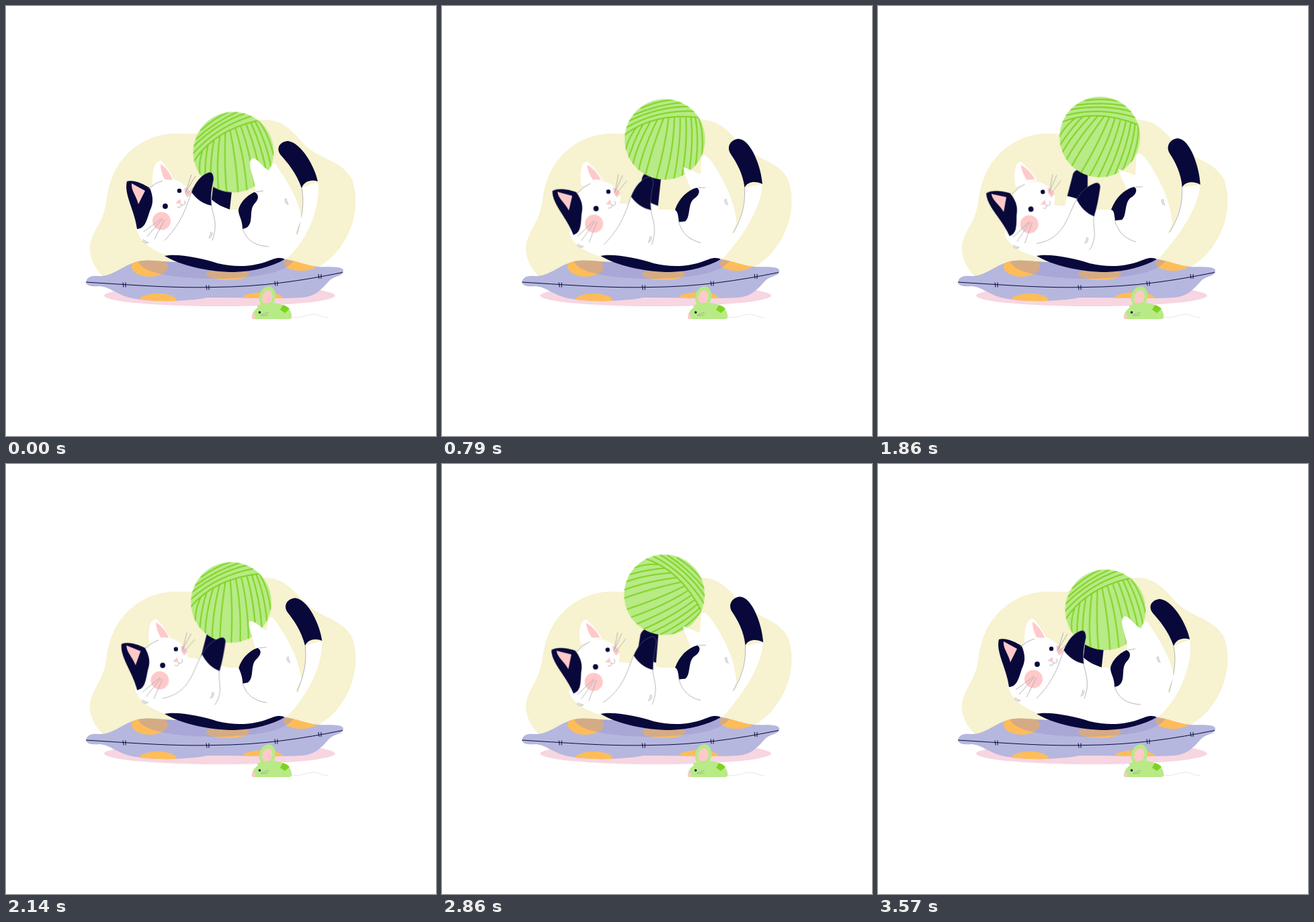
An HTML page without scripts for the animation above (3640 ms loop, 640 px wide and 640 px high).

```html
<!DOCTYPE html>
<html lang="en">
<head>
<meta charset="utf-8">
<title>Cat playing with yarn</title>
<style>
html, body { margin: 0; width: 100%; height: 100%; overflow: hidden; background: #fff; }
svg { display: block; width: 100vw; height: 100vh; }
.ink { fill: #08083a; }
.white { fill: #fff; }
.pink { fill: #ffc9c9; }
.orange { fill: #ffbd59; }
.line { fill: none; stroke: #a3a3ad; stroke-width: .8; }
.seam { fill: none; stroke: #08083a; stroke-width: 1; }
.lime { fill: #b8ea86; }

/* Three swings per loop, then a short rest */
.move, .morph, .kick, .toss, .spin { animation: 3640ms 20ms infinite both; }
.move { animation-name: move; }
.morph { animation-name: morph; }
.kick { animation-name: kick; }
.toss { animation-name: toss; }
.spin { animation-name: spin; }
.move, .morph, .kick { animation-timing-function: cubic-bezier(.37, 0, .63, 1); }
.spin { animation-timing-function: cubic-bezier(.2, 0, 0, 1); }

@keyframes move {
  0%, 32.692%, 65.385%, 98.077%, 100% { transform: none; }
  16.346%, 49.038%, 81.731% { transform: var(--to); }
}
@keyframes morph {
  0%, 32.692%, 65.385%, 98.077%, 100% { d: var(--a); }
  16.346%, 49.038%, 81.731% { d: var(--b); }
}
/* Paws paddle three times per swing */
@keyframes kick {
  0%, 10.897%, 21.795%, 32.692%, 43.59%, 54.487%, 65.385%, 76.282%, 87.179%, 98.077%, 100% { d: var(--a); }
  5.449%, 16.346%, 27.244%, 38.141%, 49.038%, 59.936%, 70.833%, 81.731%, 92.628% { d: var(--b); }
}
@keyframes toss {
  0%, 32.692%, 65.385%, 98.077%, 100% { transform: translateY(0); animation-timing-function: cubic-bezier(.08, .65, .5, 1); }
  16.346%, 49.038%, 81.731% { transform: translateY(-23.5px); animation-timing-function: cubic-bezier(.45, .15, .7, .85); }
}
@keyframes spin {
  0% { transform: rotate(0deg); }
  32.692% { transform: rotate(-360deg); }
  65.385% { transform: rotate(-720deg); }
  98.077%, 100% { transform: rotate(-1080deg); }
}

.tail { --a: path("M464 261C469 295 452 345 418 376L400 376L433 340C442 310 444 290 440 271");
        --b: path("M480 266C476 305 445 345 418 376L400 376L434 337C450 310 453 295 453 270"); }
.tail-line { --a: path("M433 340C442 310 444 290 440 271");
             --b: path("M434 337C450 310 453 295 453 270"); }
.tail-tip { --a: path("M440 271C432 248 418 232 409 222C400 210 410 201 420 201C440 204 460 240 464 261C455 258 444 260 440 271Z");
            --b: path("M453 270C452 250 443 232 435 220C427 207 438 197 447 197C465 198 479 240 480 266C472 261 458 260 453 270Z"); }
.body { --a: path("M194 331C198 350 215 362 238 371C300 398 370 396 416 377L433 345L425 290L372 277L350 303L333 303L306 292L274 282L215 285Z");
        --b: path("M188 340C195 358 215 368 238 374C300 398 370 396 416 377L433 345L425 290L372 275L349 303L324 303L302 298L277 298L205 290Z"); }
.leg { --a: path("M371 278C373 262 358 236 365 228C371 222 380 238 391 245L396 236C398 233 400 233 403 238C414 254 438 290 440 318L425 350L365 330Z");
       --b: path("M371 275C366 262 360 252 358 243C366 247 376 250 383 252L384 224C386 215 394 220 402 232C418 255 436 290 438 325L425 350L365 330Z"); }
.foot { --a: path("M370 277C376 280 377 286 371 293C360 303 370 322 358 330L352 332C352 318 346 312 346 304C348 292 360 281 370 277Z");
        --b: path("M381 269C387 271 385 280 378 284C366 290 371 312 363 318L353 319C351 308 352 305 347 303C354 285 366 273 381 269Z"); }
.thigh { --a: path("M372 277L383 275M352 331C358 350 372 357 391 358");
         --b: path("M383 269L394 269M352 317C357 337 368 346 384 351"); }
.far-arm { --a: path("M306 286L333 302L333 330L290 330Z");
           --b: path("M293 289L324 297L324 330L290 309Z"); }
.far-paw { --a: path("M309 262C314 246 336 244 338 258L333 303C322 300 313 294 306 288Z");
           --b: path("M303 255C309 246 322 250 323 259L324 299C314 295 304 291 293 290Z"); }
.near-arm { --a: path("M236 349C262 322 268 300 276 277L306 290C304 308 318 318 307 349");
            --b: path("M229 345C276 342 278 302 293 281L318 306C314 324 324 337 309 357"); }
.near-paw { --a: path("M301 248C306 246 309 250 309 258C306 272 304 285 306 297C293 295 282 286 276 277C282 262 290 252 301 248Z");
            --b: path("M319 258C326 255 330 259 328 266C326 280 324 292 318 307C306 302 298 292 293 281C299 270 309 262 319 258Z"); }

.head { --to: translate(-6.5px, 5px) rotate(-8deg); transform-origin: 231.5px 320px; }
.ear { --to: rotate(-9deg); transform-origin: 207px 300px; }
.far-ear { --to: translate(1px, -4px); }
.near { --to: translate(6px, 8px); }
.far { --to: translate(-14px, -7px); }
.ball { --to: translateX(-8.5px); }
.hip { --to: translate(7px, 1px); }
</style>
</head>
<body>
<svg viewBox="0 0 640 640">
  <defs>
    <path id="cushion" d="M119 411C121 402 128 401 140 402C160 402 175 385 197 380C212 377 230 380 250 381L400 380L415 377C432 379 449 387 464 388C478 389 502 386 502 394C502 403 490 400 480 410C468 424 458 433 440 434C400 436 350 434 300 434C270 440 210 442 180 433C160 426 155 419 140 417C128 418 120 417 119 411Z"/>
    <clipPath id="in-cushion"><use href="#cushion"/></clipPath>
    <clipPath id="in-ball"><circle r="60"/></clipPath>
    <path id="stitch" d="M-2-3.5L-1 3.5M2-3.5L2 3.5"/>
    <path id="fur" class="line" d="M-2-4L-1 1M0-5L1 0M1 0L3 5M-1 1L1 4"/>
  </defs>

  <path fill="#f7f2cf" d="M145 403C130 390 120 365 127 348C135 325 146 320 150 285C158 225 205 187 260 190C300 192 340 180 375 170C410 165 425 185 445 207C470 230 500 230 515 258C527 290 518 330 500 355C490 372 475 382 464 389L415 400Z"/>
  <ellipse fill="#f7d6e1" cx="318" cy="431" rx="172" ry="16"/>

  <use href="#cushion" fill="#b5b7de"/>
  <g clip-path="url(#in-cushion)">
    <g class="orange">
      <ellipse cx="214" cy="388" rx="27" ry="15"/>
      <ellipse cx="330" cy="399" rx="32" ry="9"/>
      <ellipse cx="439" cy="383" rx="26" ry="11"/>
      <ellipse cx="226" cy="438" rx="28" ry="10"/>
      <ellipse cx="382" cy="435" rx="30" ry="9"/>
    </g>
    <path fill="#9790c9" opacity=".4" d="M196 378C200 398 250 406 320 406C380 404 420 396 430 376Z"/>
  </g>
  <path class="seam" d="M119 411C200 416 250 420 310 418.500C380 418 440 409 501 396.500"/>
  <g class="seam">
    <use href="#stitch" x="176" y="415"/>
    <use href="#stitch" x="300" y="419"/>
    <use href="#stitch" x="402" y="413"/>
    <use href="#stitch" x="467" y="402.500"/>
  </g>

  <g class="far move">
    <path class="white far-arm kick"/>
    <path class="ink far-paw kick"/>
  </g>

  <path class="white tail morph"/>
  <path class="line tail-line morph"/>
  <path class="ink tail-tip morph"/>

  <g class="ball move"><g class="toss"><g transform="translate(338.500 217.500)">
    <g class="spin" clip-path="url(#in-ball)">
      <circle class="lime" r="60"/>
      <path fill="none" stroke="#7ed321" stroke-width="2" d="M-60 15Q-30-32 36-47M-60 2Q-25-38 28-54M-60-8Q-25-43 18-58M-56-19Q-28-45 8-61M-49-32Q-30-50-5-61
        M-46-2Q-52 15-50 34M-38-11Q-43 15-42 44M-29-18Q-36 20-33 52M-20-25Q-26 20-22 57M-12-29Q-14 20-10 60M-5-32Q4 10 7 60M3-35Q16 5 20 57M11-38Q25 0 32 52M19-41Q34-5 42 44M26-44Q42-10 50 34M32-46Q48-18 56 22M37-47Q52-28 60 5"/>
    </g>
  </g></g></g>

  <path class="white body morph"/>
  <path class="ink" d="M236 372C255 368 290 375 315 383C345 390 370 388 397 377C405 374 412 375 415 377C395 388 370 395 340 396C300 396 260 386 236 372Z"/>
  <path class="white leg morph"/>
  <path class="ink foot morph"/>
  <path class="line thigh morph"/>
  <g class="hip move"><use href="#fur" x="417" y="291"/></g>

  <g class="head move">
    <path class="white" d="M195 331C206 325 214 295 214 271C220 265 227 261 234 259L250 258C262 262 270 268 275 282C275 295 265 310 255 330L220 358C205 352 198 343 195 331Z"/>
    <g class="far-ear move">
      <path class="white" d="M218 266C217 245 222 230 231 230C240 240 246 250 251 260Z"/>
      <path class="pink" d="M230 235C238 240 245 250 248 259L236 258C232 250 230 243 230 235Z"/>
    </g>
    <g class="ear move">
      <path class="ink" d="M180 261C190 258 205 265 214 271C220 285 219 295 214 305C208 325 205 331 195 332C192 305 175 280 180 261Z"/>
      <path class="pink" d="M187 264L207 275L197 295C194 282 186 275 187 264Z"/>
    </g>
    <circle class="pink" cx="231.500" cy="320" r="13.500"/>
    <path class="pink" d="M266 270C271 271 275 277 275 280L270 285C266 281 265 275 266 270ZM252 293L259.500 287L260.500 295Z"/>
    <circle class="ink" cx="258" cy="275" r="3.200"/>
    <circle class="ink" cx="237" cy="298" r="3.900"/>
    <path class="line" d="M212 272Q222 263 233 260M260 295Q264 298 266 295Q268 291 265 290M261 296Q261 301 255 299
      M232 316L205 336M233 317L210 343M236 318L221 347M267 278L282 253M269 280L287 262M268 276L276 251"/>
    <use href="#fur" transform="translate(207 351) rotate(-45)"/>
  </g>

  <g class="near move">
    <path class="line near-arm kick" style="fill:#fff"/>
    <path class="ink near-paw kick" stroke="#9a9ab0" stroke-width=".4"/>
    <use href="#fur" transform="translate(305 341) scale(-1 1)"/>
  </g>

  <path class="line" stroke-opacity=".35" d="M425 463C440 466 448 458 460 459C468 459 470 465 480 463"/>
  <path class="lime" d="M366 465C365 453 377 445 390 442C410 440 427 450 425 464Q424 466 420 466L368 466Z"/>
  <ellipse class="lime" cx="389" cy="433" rx="12" ry="16" transform="rotate(12 389 433)"/>
  <ellipse class="pink" cx="389" cy="433.500" rx="7.500" ry="10.500" transform="rotate(15 389 433)"/>
  <path class="lime" d="M374 446Q390 438 402 445L396 454L376 454Z"/>
  <path fill="#7ed321" d="M412 445Q418 446 422 451L415 457L408 452Z"/>
  <path class="pink" d="M366 465Q365 460 368 458Q373 461 370 466Z"/>
  <circle class="ink" cx="377.500" cy="456" r="1.800"/>
  <path class="line" d="M379 460L391 456M380 461L390 460"/>
</svg>
</body>
</html>
```
